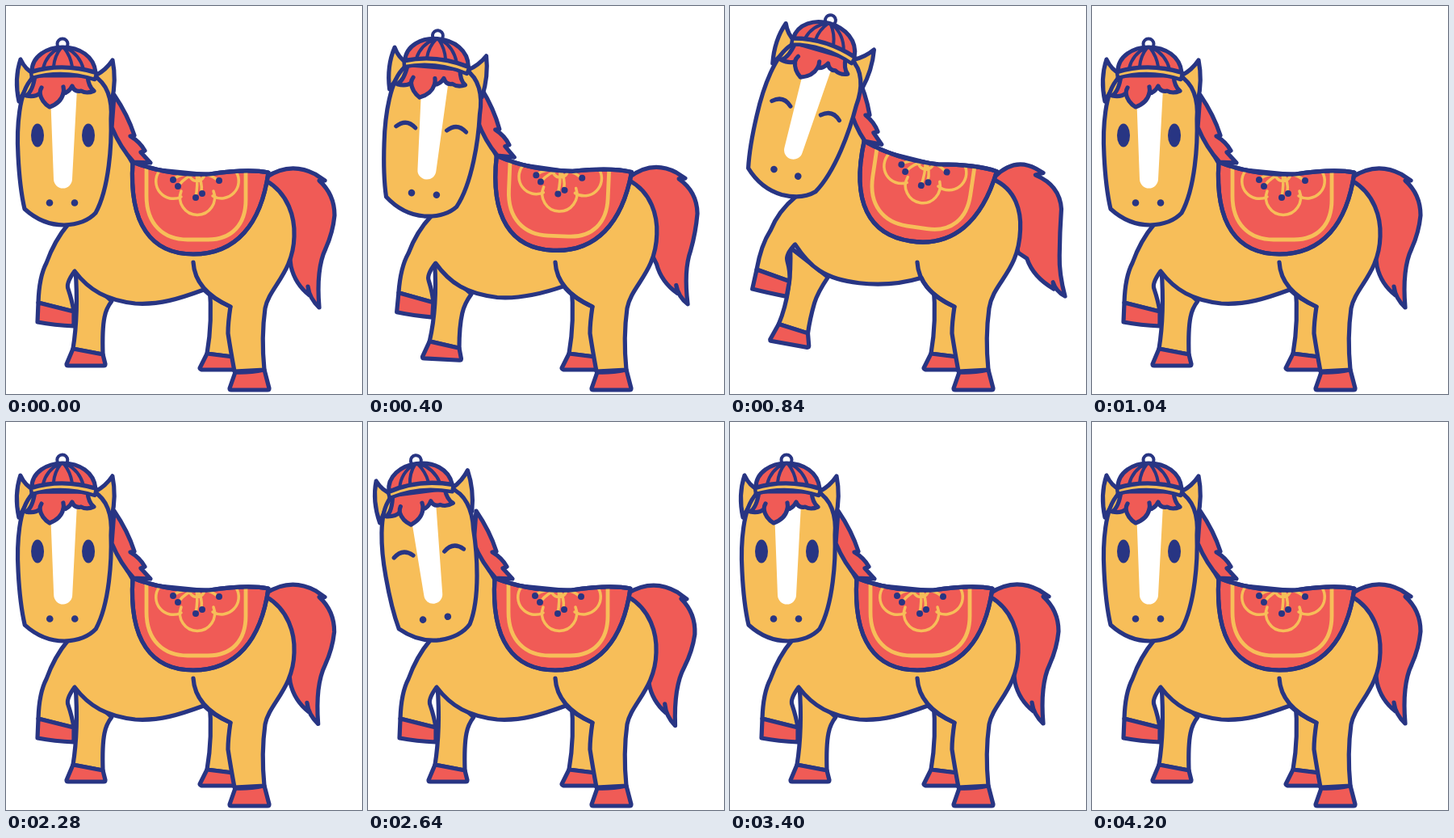
An HTML page for the animation above (4.8 s loop, 441 by 480 pixels).

```html
<!DOCTYPE html>
<html lang="en">
<head>
<meta charset="utf-8">
<title>Festive horse</title>
<style>
  html, body { margin: 0; width: 100%; height: 100%; overflow: hidden; background: #fff; }
  svg { display: block; width: 100vw; height: 100vh; }
  .line { stroke: #283583; stroke-width: 5.2; stroke-linejoin: round; stroke-linecap: round; fill: none; }
  .skin { fill: #f7be59; }
  .red { fill: #f05b56; }
  .navy { fill: #283583; }
  .gold { fill: none; stroke: #f7be59; stroke-linecap: round; }
</style>
</head>
<body>
<svg viewBox="0 0 441 480">
  <defs>
    <path id="cloth" d="M157 193Q200 210 252 208Q300 201 325 206C316 270 285 307 232 307C180 307 152 270 157 193Z"/>
    <clipPath id="clothClip"><use href="#cloth"/></clipPath>
  </defs>

  <g id="tail">
    <path class="line red"
      d="M322 212Q352 192 383 208L395 216L388 216Q407 233 407 259Q405 280 396 300Q384 325 388 373Q376 362 374 347L376 358Q358 344 353 322L352 314Z"
      data-to="M328 212Q352 186 378 200L387 205L377 208Q409 220 411 250Q409 280 410 310Q411 332 419 357Q408 352 404 341L405 349Q378 334 370 311L358 304Z"/>
  </g>

  <!-- far legs -->
  <path class="line skin" d="M252 345Q256 390 249 430L281 434V345Z"/>
  <path class="line red" d="M249 430L240 448Q241 450 244 450H283L281 434Z"/>
  <path class="line skin"
    d="M86 325Q90 380 83 424L120 431Q119 400 122 385Q124 374 131 365Z"
    data-to="M73 295Q75 350 57 389L93 401Q96 385 102 365Q106 352 120 331Z"/>
  <path class="line red"
    d="M83 424L75 443Q75 445 77 445L121 445Q123 445 123 443L120 431Z"
    data-to="M57 389L46 408Q46 410 48 410L92 419Q94 419 94 417L93 401Z"/>

  <!-- body with near legs -->
  <path class="line skin"
    d="M122 135L160 200L322 216C350 232 358 262 357 285C356 330 326 348 321 374Q316 410 320 450L283 452Q278 425 275 405Q275 392 278 372Q256 362 245 351C215 362 190 370 160 368C125 364 103 352 85 328Q74 343 77 350Q82 365 84 378L40 367Q41 335 50 318Q60 290 77 270Z"
    data-to="M143 100L172 172L326 214C356 226 361 255 360 275C358 330 326 340 321 374Q316 410 320 450L283 452Q278 425 275 405Q275 392 278 372Q245 357 236 334C205 343 175 341 160 339C115 334 98 318 80 290Q68 302 70 310Q74 325 72 335L32 320Q38 290 50 272Q60 248 82 231Z"/>
  <path class="line" d="M278 372Q234 352 232 317"/>
  <path class="line red"
    d="M40 367L39 391Q60 395 84 396L84 378Z"
    data-to="M32 320L26 344Q45 349 68 354L72 335Z"/>
  <path class="line red" d="M284 453L277 473Q277 475 279 475H324Q326 475 326 473L320 450Q300 454 284 453Z"/>

  <!-- mane and saddle cloth -->
  <g id="saddle">
    <path class="line red" d="M134 110Q151 135 159 160L154 161Q166 168 172 179L167 181L179 194L158 193Q142 176 131 150Z"/>
    <use href="#cloth" class="line red"/>
    <g class="gold" clip-path="url(#clothClip)">
      <path stroke-width="4.8" d="M174 195V235C174 270 195 289 225 289H250C280 289 297 270 297 240V198"/>
      <path stroke-width="3.5" d="M190 204A21.5 21.5 0 0 0 217 236M217 229A21.5 21.5 0 1 0 257 229M256 235A21.5 21.5 0 0 0 285 205"/>
      <path stroke-width="3.5" d="M209 213Q220 206 236 207M214 222Q222 211 236 207M235 236Q238 222 236 207M242 231Q244 217 236 207M262 215Q250 206 236 207M227 207A9 9 0 0 0 246 207"/>
    </g>
    <g class="navy">
      <circle cx="207" cy="215" r="4"/><circle cx="213" cy="223" r="4"/>
      <circle cx="235" cy="237" r="4"/><circle cx="243" cy="232" r="4"/>
      <circle cx="264" cy="216" r="4"/>
    </g>
    <use href="#cloth" class="line"/>
  </g>

  <g id="head">
    <path class="line skin" d="M35 84Q24 79 18 66Q10 90 16 118ZM111 86Q124 79 132 67Q137 92 131 118Z"/>
    <path class="line skin" d="M32 90C16 106 13 150 15 185Q17 225 23 251Q45 271 72 271Q98 270 111 256C128 225 131 170 130 140C132 115 125 95 108 86Z"/>
    <path fill="#fff" d="M55 108L88 102L82 214A11.5 11.5 0 0 1 59 214Z"/>
    <path class="line red" d="M36 86C34 100 31 107 25 111Q36 113 42 108Q44 119 54 125Q68 120 71 108Q78 107 82 99Q85 107 93 105Q100 109 109 105Q102 100 101 86Z"/>
    <path class="line" d="M42 108Q42 104 44 101M71 108Q72 104 71 100"/>
    <circle class="line" style="fill:#fff;stroke-width:4" cx="70" cy="47" r="6.5"/>
    <path class="line red" d="M32 81C32 62 51 51 70 51C91 51 109 62 111 82Q70 70 32 81Z"/>
    <path class="line" style="stroke-width:4" d="M66 52Q50 60 46 77M68 52Q60 62 59 75M72 52Q80 62 82 75M75 52Q91 60 96 78"/>
    <path class="line skin" style="stroke-width:4.5" d="M31 82Q70 70 112 83L110 91Q70 78 32 89Z"/>
    <g id="open" class="navy">
      <ellipse cx="39" cy="160" rx="8" ry="14.5"/>
      <ellipse cx="102" cy="160" rx="8" ry="14.5"/>
    </g>
    <path id="smile" class="line" d="M28 163Q40 152 52 163M91 163Q103 152 115 163"/>
    <g class="navy"><circle cx="54" cy="243.5" r="4.3"/><circle cx="85" cy="243.5" r="4.3"/></g>
  </g>
</svg>
<script>
const $ = id => document.getElementById(id);
const NUM = /\d+/g;
const morphs = [...document.querySelectorAll('[data-to]')].map(el => ({
  el, from: el.getAttribute('d'), to: el.dataset.to.match(NUM).map(Number)
}));

const ease = x => (1 - Math.cos(Math.PI * Math.min(1, Math.max(0, x)))) / 2;
// 0 to 1 between a and b, held until c, back to 0 at d
const swing = (t, a, b, c, d) => t < c ? ease((t - a) / (b - a)) : 1 - ease((t - c) / (d - c));
const pulse = (t, a, b, c) => swing(t, a, b, b, c);
const place = (id, value) => $(id).setAttribute('transform', value);

function draw() {
  const t = Math.floor(performance.now() % 4800 / 40) * 40;
  const rear = 1.26 * swing(t, 280, 680, 720, 1040);
  const tilt = pulse(t, 2240, 2700, 3400);
  const wag = pulse(t, 2240, 2490, 2740) + pulse(t, 2740, 3070, 3400);
  const blink = pulse(t, 1440, 1600, 1760) + pulse(t, 3880, 4040, 4200);

  for (const { el, from, to } of morphs) {
    let i = 0;
    el.setAttribute('d', from.replace(NUM, n => (+n + (to[i++] - n) * rear).toFixed(2)));
  }
  place('tail', `rotate(${7.8 * wag} 330 215)`);
  place('saddle', `rotate(${9.7 * rear} 337 242)`);
  place('head', `translate(0 ${-42.5 * rear}) rotate(${18.5 * rear} 70 243) rotate(${-7.5 * tilt} 70 132)`);
  place('open', `translate(0 160) scale(1 ${1 - 0.9 * blink}) translate(0 -160)`);

  const happy = rear > 0.2 || tilt > 0.2;
  $('open').style.display = happy ? 'none' : '';
  $('smile').style.display = happy ? '' : 'none';
  requestAnimationFrame(draw);
}
draw();
</script>
</body>
</html>
```
